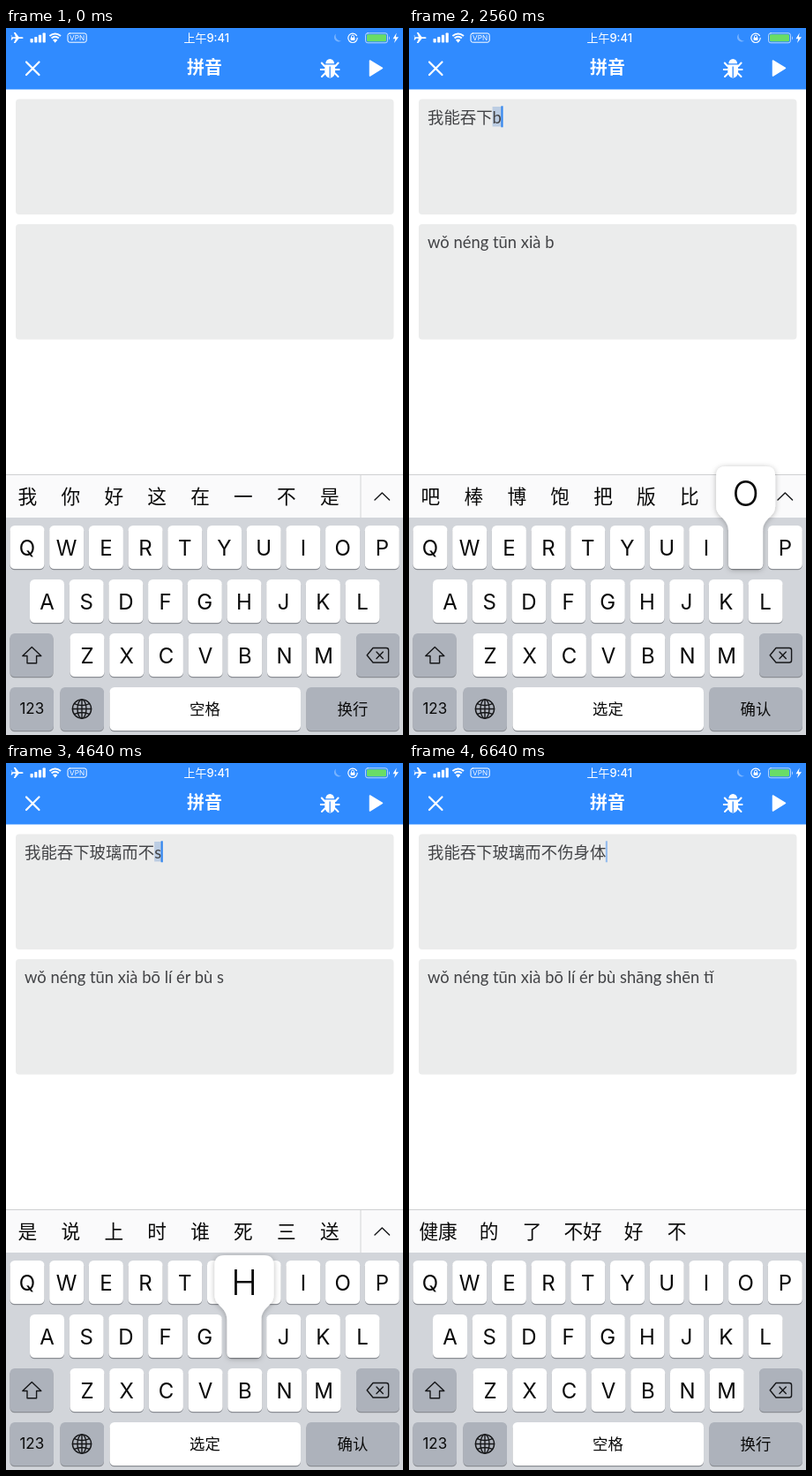
Write an HTML page that moves like this. It is 450 px wide and 800 px high and loops after 6720 ms.

```html
<!DOCTYPE html>
<html lang="zh-CN">
<head>
<meta charset="utf-8">
<title>拼音</title>
<style>
  html, body { margin: 0; width: 100%; height: 100%; overflow: hidden; background: #fff; }
  svg { display: block; width: 100vw; height: 100vh; }
  text { font-family: Inter, "Noto Sans CJK SC", "Noto Sans CJK", sans-serif; fill: #0a0a0a; }
  .mid { text-anchor: middle; }
  .body { font: 18.4px Lato, "Noto Sans CJK SC", "Noto Sans CJK", sans-serif; fill: #424346; }
  .word { font-size: 21.7px; }
  .white { fill: #fff; }
  .line { fill: none; stroke: #161719; stroke-width: 1.4; stroke-linejoin: round; stroke-linecap: round; }
  .wline { fill: none; stroke: #fff; stroke-linecap: round; }
</style>
</head>
<body>
<svg viewBox="0 0 450 800">
  <defs>
    <filter id="soft" x="-30%" y="-30%" width="160%" height="160%">
      <feDropShadow dx="0" dy="1" stdDeviation="3" flood-color="#000" flood-opacity=".28"/>
    </filter>
    <linearGradient id="gold" x2="0" y2="1"><stop stop-color="#f3bd3e"/><stop offset="1" stop-color="#c9793d"/></linearGradient>
    <linearGradient id="slate" x2="0" y2="1"><stop stop-color="#a9bfd9"/><stop offset="1" stop-color="#6788ae"/></linearGradient>
  </defs>

  <rect width="450" height="800" fill="#fff"/>
  <rect width="450" height="69.5" fill="#308bff"/>

  <!-- status bar -->
  <g fill="#fff">
    <path d="M6 10.2L11 10.2L8.8 5H10.6L14.6 10.2H18.5Q21 11 18.5 11.9H14.6L10.6 17H8.8L11 11.9L8 11.8L6.8 13.6H5.6L6.3 11L5.6 8.5H6.8Z"/>
    <rect x="27.5" y="12" width="3.2" height="4.5" rx=".8"/>
    <rect x="32.2" y="10" width="3.2" height="6.5" rx=".8"/>
    <rect x="36.9" y="7.8" width="3.2" height="8.7" rx=".8"/>
    <rect x="41.6" y="5.5" width="3.2" height="11" rx=".8"/>
    <path d="M53 13.6Q55.7 11.5 58.4 13.6L55.7 16.8Z"/>
    <path d="M438.5 12.2L442.7 5.5L441.8 10.2H445L440 17L441.3 12.2Z"/>
    <path d="M374 6.5A5 5 0 1 0 380 14.6A6 6 0 0 1 374 6.5Z" opacity=".35"/>
  </g>
  <g class="wline">
    <path d="M49.4 9.1Q55.7 3.8 62 9.1M51.6 11.6Q55.7 8 59.8 11.6" stroke-width="2" stroke-linecap="butt"/>
    <rect x="70" y="6" width="21.2" height="10.2" rx="2.2" stroke-width="1"/>
    <circle cx="393" cy="11.3" r="5.2" stroke-width="1.2" stroke-dasharray="29 3.7"/>
    <path d="M391.5 11V9.6a1.5 1.5 0 0 1 3 0V11" stroke-width="1"/>
    <rect x="407.5" y="5.8" width="25" height="11" rx="2.5" stroke-width="1" opacity=".65"/>
  </g>
  <rect x="390.6" y="10.7" width="4.8" height="3.4" rx=".5" fill="#fff"/>
  <rect x="409" y="7.3" width="22" height="8" rx="1.3" fill="#69dd66"/>
  <path d="M434 9.2Q436 11.3 434 13.4Z" fill="#fff" opacity=".65"/>
  <text class="mid white" x="80.6" y="14.2" font-size="8.2">VPN</text>
  <text class="mid white" x="227.3" y="16" font-size="13" font-weight="500">上午9:41</text>

  <!-- title bar -->
  <path class="wline" d="M23 38.5L37.5 53M37.5 38.5L23 53" stroke-width="2.2"/>
  <text class="mid white" x="225" y="52.3" font-size="20" font-weight="600">拼音</text>
  <path d="M362.3 40.2a4.9 5.2 0 0 1 9.8 0ZM361.3 41.6H373.1V49.5a5.9 7 0 0 1-11.8 0Z" fill="#fff"/>
  <path class="wline" d="M361 43L357.8 39.5M373.4 43L376.6 39.5M360.8 47H356.8M373.6 47H377.6M361.5 51.5L358 55M373 51.5L376.5 55" stroke-width="2"/>
  <path d="M367.2 43.5V56" stroke="#308bff" stroke-width="1.3"/>
  <path d="M412.5 37L426.5 45.4L412.5 54Z" fill="#fff" stroke="#fff" stroke-width="1.5" stroke-linejoin="round"/>

  <!-- text areas -->
  <g fill="#ebecec">
    <rect x="11" y="80.5" width="428.5" height="130.5" rx="4"/>
    <rect x="11" y="222" width="428.5" height="130.5" rx="4"/>
  </g>
  <rect id="mark" y="89" height="22.5" fill="#bccde3"/>
  <text id="typed" class="body" x="21" y="107.6"/>
  <rect id="caret" y="88.3" width="2.2" height="24" fill="#3487ef"/>
  <text id="reading" class="body" x="21" y="249"/>

  <!-- candidates -->
  <rect y="505" width="450" height="49" fill="#fafafb"/>
  <path d="M0 505.5H450" stroke="#cfd0d2"/>
  <g id="words"></g>
  <g id="more">
    <rect x="402" y="506" width="48" height="48" fill="#fafafb"/>
    <path d="M402 506V554" stroke="#d3d4d6"/>
    <path class="line" d="M418 534L426.3 526L434.6 534"/>
  </g>

  <!-- keyboard -->
  <rect y="554" width="450" height="246" fill="#d2d5da"/>
  <g id="keys"></g>
  <path class="line" d="M29.3 700.5L39.8 710.5H34.6V718.7H24V710.5H18.8Z"/>
  <path class="line" d="M416 701.5H431Q433.6 701.5 433.6 704V715.5Q433.6 718 431 718H416L409.2 709.7ZM420 706L427.3 713.4M427.3 706L420 713.4"/>
  <g class="line" stroke-width="1.2">
    <circle cx="86" cy="770.5" r="10.6"/>
    <ellipse cx="86" cy="770.5" rx="5" ry="10.6"/>
    <path d="M86 760V781M75.4 770.5H96.6M77.6 764.6Q86 768.5 94.4 764.6M77.6 776.4Q86 772.5 94.4 776.4"/>
  </g>
  <text class="mid" x="29.3" y="776.3" font-size="17">123</text>
  <text id="spaceLabel" class="mid" x="225.5" y="777.3" font-size="17.4"/>
  <text id="returnLabel" class="mid" x="393" y="777.3" font-size="17.4"/>
  <g id="popup">
    <path id="bubble" fill="#fff" filter="url(#soft)"/>
    <text id="bigLetter" class="mid" font-size="40" font-weight="300"/>
  </g>
</svg>

<script>
const LOOP = 6720, TICK = 80, KEY_W = 39, KEY_H = 49, PITCH = 44.7;
const $ = id => document.getElementById(id);
const thin = '\u2006';

// Letters extend the composition; pairs commit [characters, reading].
const steps = [
  [0, '', '我 你 好 这 在 一 不 是'],
  [160, 'w', '我 为 无 问 玩 王 文 万'],
  [320, 'o', '我 握 窝 卧 沃 喔 涡 蜗'],
  [480, ['我', 'wǒ'], '的 是 在 们 也 不 要 就'],
  [640, 'n', '你 那 能 呢 哪 年 女 拿'],
  [800, 'e', '呢 讷 哪 那 能 嫩 内 馁'],
  [960, 'n', '嫩 能 恁 呢 讷 哪 那 内'],
  [1120, 'g', '能 嫩 弄 呢 恁 农 讷 内'],
  [1280, ['能', 'néng'], '不 有 在 说 看 给 去 做'],
  [1440, 't', '他 她 它 天 听 太 头 同'],
  [1520, 'u', '图 吐 🤮 土 涂 兔 🐰 突'],
  [1600, 'n', '图 吐 🤮 土 涂 兔 🐰 突'],
  [1760, ['吞', 'tūn'], '了 下 不 的 吐 进 没 掉'],
  [1920, 'x', '下 想 小 学 行 像 先 些'],
  [2000, 'i', '系 洗 西 喜 习 细 戏 吸'],
  [2160, 'a', '下 夏 吓 先 想 小 虾 瞎'],
  [2320, ['下', 'xià'], '了 去 的 来 面 一 午 次'],
  [2480, 'b', '吧 棒 博 饱 把 版 比 🆚'],
  [2640, 'o', '博 波 播 伯 玻 拨 薄 泊'],
  [2800, ' l', '玻璃 菠萝 伯乐 博览 波 博 播'],
  [2960, 'i', '玻璃 剥离 薄利 波 博 播 伯'],
  [3200, ['玻璃', 'bō lí'], '吗 么 制品 的 上 没有 幕墙'],
  [3440, 'e', '嗯 额 饿 俄 恶 鹅 而 二'],
  [3600, 'r', '而 二 儿 耳 尔 饵 贰 洱'],
  [3840, ' b', '而不 二百 耳边 而被 儿 而 二'],
  [4080, 'u', '而不 二部 耳部 二不怕死 而 二'],
  [4400, ['而不', 'ér bù'], '是 会 能 用 要 得 知 同'],
  [4560, 's', '是 说 上 时 谁 死 三 送'],
  [4720, 'h', '是 说 上 时 谁 少 事 手'],
  [4960, 'a', '啥 沙 杀 傻 上 山 少 伤'],
  [5120, 'n', '伤 散 上 ⬆️ 山 ⛰️ 三 删'],
  [5360, ' s', '上市 三十 山上 散失 伤 上 山'],
  [5520, 'h', '上市 三十 山上 伤势 伤 上 山'],
  [5680, 'e', '上社 商社 山蛇 伤 散 上 山'],
  [5840, 'n', '上身 伤神 伤身 山神 伤 上 山'],
  [6000, ' t', '伤身体 上身 伤神 伤身 伤 上'],
  [6160, 'i', '伤身体 上身 伤神 伤身 伤 上'],
  [6400, ['伤身体', 'shāng shēn tǐ'], '健康 的 了 不好 好 不'],
];

let done = '', comp = '', reading = [];
const states = steps.map(([time, input, words]) => {
  if (Array.isArray(input)) {
    done += input[0];
    reading = [...reading, input[1]];
    comp = '';
  } else comp += input.replace(' ', thin);
  const spoken = [...reading, comp].filter(Boolean).join(' ');
  return { time, done, comp, spoken, words: words.split(' ') };
});
const presses = steps.filter(s => typeof s[1] === 'string' && s[1])
  .map(([time, input]) => ({ time, letter: input.trim().toUpperCase() }));
const spacePresses = [3200, 4400];

// Small pictures drawn around (0, 0), about 22px across.
const tile = fill => `<rect x="-12" y="-12" width="24" height="24" rx="4" fill="${fill}"/>`;
const pictures = {
  '🤮': `<circle r="10.6" cy="-1" fill="#f8cb3f"/><path d="M-7-5l4 2l-4 2M7-5l-4 2l4 2" fill="none" stroke="#5b3a12" stroke-width="1.6"/>
    <path d="M-4 2Q0-2 4 2L6 10Q0 14-6 10Z" fill="#55b33b"/><ellipse cy="2" rx="4" ry="1.8" fill="#3b7b28"/>`,
  '🐰': `<g fill="#a3a6aa"><ellipse cx="-5.5" cy="-6" rx="3" ry="6.5" transform="rotate(-14 -5.5 -6)"/><ellipse cx="5.5" cy="-6" rx="3" ry="6.5" transform="rotate(14 5.5 -6)"/><ellipse cy="3.5" rx="8.5" ry="8"/></g>
    <g fill="#e3b8bd"><ellipse cx="-5.8" cy="-6" rx="1.2" ry="4"/><ellipse cx="5.8" cy="-6" rx="1.2" ry="4"/></g>
    <ellipse cy="7" rx="5.5" ry="4" fill="#eee"/><circle cx="-4" cy="2" r="1.4"/><circle cx="4" cy="2" r="1.4"/><path d="M-1.8 4.5H1.8L0 6.3Z" fill="#d6868f"/>`,
  '🆚': tile('url(#gold)') + '<text class="mid white" y="4.8" font-size="13.5" font-weight="700">VS</text>',
  '⬆️': tile('url(#slate)') + '<path d="M0-8L7.5-.5H3.5V8H-3.5V-.5H-7.5Z" fill="#fff"/>',
  '⛰️': `<path d="M-12 10L-3-7L0-9L4-3L7-2L12 10Z" fill="#75736c"/><path d="M-3-7L0-9L4-3L1 0L-1-3L-5 1Z" fill="#d3d5d5"/>
    <path d="M-12 10L-7 4L0 8L6 3L12 10Z" fill="#56634b"/>`,
};

function wordRow(words) {
  let x = 0;
  return words.map(word => {
    const picture = pictures[word];
    const width = picture ? 48.9 : Math.max(48.9, word.length * 21.7 + 22.8);
    const cx = x + width / 2;
    x += width;
    return picture ? `<g transform="translate(${cx} 530)">${picture}</g>`
      : `<text class="mid word" x="${cx}" y="538">${word}</text>`;
  }).join('');
}

const keyBox = (x, y, w, fill, id = '') =>
  `<rect x="${x}" y="${y + 1.3}" width="${w}" height="${KEY_H}" rx="5.3" fill="#8b8e94"/>
   <rect id="${id}" x="${x}" y="${y}" width="${w}" height="${KEY_H}" rx="5.3" fill="${fill}"/>`;

const places = {};
const GREY = '#adb2bb';
let keyboard = '';
[['QWERTYUIOP', 4.5, 563], ['ASDFGHJKL', 27, 624], ['ZXCVBNM', 72.5, 685]].forEach(([row, left, y]) =>
  [...row].forEach((letter, i) => {
    const x = left + i * PITCH;
    places[letter] = { x, y };
    keyboard += keyBox(x, y, KEY_W, '#fff') +
      `<text class="mid" x="${x + KEY_W / 2}" y="${y + 33.6}" font-size="24">${letter}</text>`;
  }));
keyboard += keyBox(4.5, 685, 49, GREY) + keyBox(397, 685, 49, GREY) + keyBox(4.5, 746, 49.5, GREY) +
  keyBox(61.5, 746, 49.5, GREY) + keyBox(117.5, 746, 216.5, '#fff', 'space') + keyBox(340.5, 746, 105.5, GREY);
$('keys').innerHTML = keyboard;

function showPopup(press) {
  $('popup').style.display = press ? '' : 'none';
  if (!press) return;
  const { x, y } = places[press.letter];
  $('bubble').setAttribute('d', `M${x - 3} ${y - 67}h45q11 0 11 11v34c0 13-14 13-14 28v${KEY_H - 11.3}
    q0 5.3-5.3 5.3h-28.4q-5.3 0-5.3-5.3v${11.3 - KEY_H}c0-15-14-15-14-28v-34q0-11 11-11Z`);
  const label = $('bigLetter');
  label.setAttribute('x', x + KEY_W / 2);
  label.setAttribute('y', y - 22.5);
  label.textContent = press.letter;
}

let shown;
function showState(state) {
  if (state === shown) return;
  shown = state;
  const typed = $('typed');
  typed.textContent = state.done;
  const start = state.done ? typed.getComputedTextLength() : 0;
  typed.textContent = state.done + state.comp;
  const end = typed.textContent ? typed.getComputedTextLength() : 0;
  $('mark').setAttribute('x', 21 + start);
  $('mark').setAttribute('width', end - start);
  $('caret').setAttribute('x', 20.5 + end);
  $('reading').textContent = state.spoken;
  $('words').innerHTML = wordRow(state.words);
  $('more').style.display = state === states[states.length - 1] ? 'none' : '';
  $('spaceLabel').textContent = state.comp ? '选定' : '空格';
  $('returnLabel').textContent = state.comp ? '确认' : '换行';
}

function draw(now) {
  const t = Math.floor((now % LOOP) / TICK) * TICK;
  showState(states.filter(s => s.time <= t).pop());
  showPopup(presses.filter(p => t >= p.time - TICK && t < p.time + TICK).pop());
  const held = spacePresses.some(p => t >= p - TICK && t < p);
  $('space').setAttribute('fill', held ? GREY : '#fff');
  $('caret').setAttribute('opacity', t === 0 ? 0 : Math.min(1, 1 - (t - 6480) / 300));
}

const begin = performance.now();
function frame() {
  draw(performance.now() - begin);
  requestAnimationFrame(frame);
}
draw(0);
requestAnimationFrame(frame);
</script>
</body>
</html>
```
